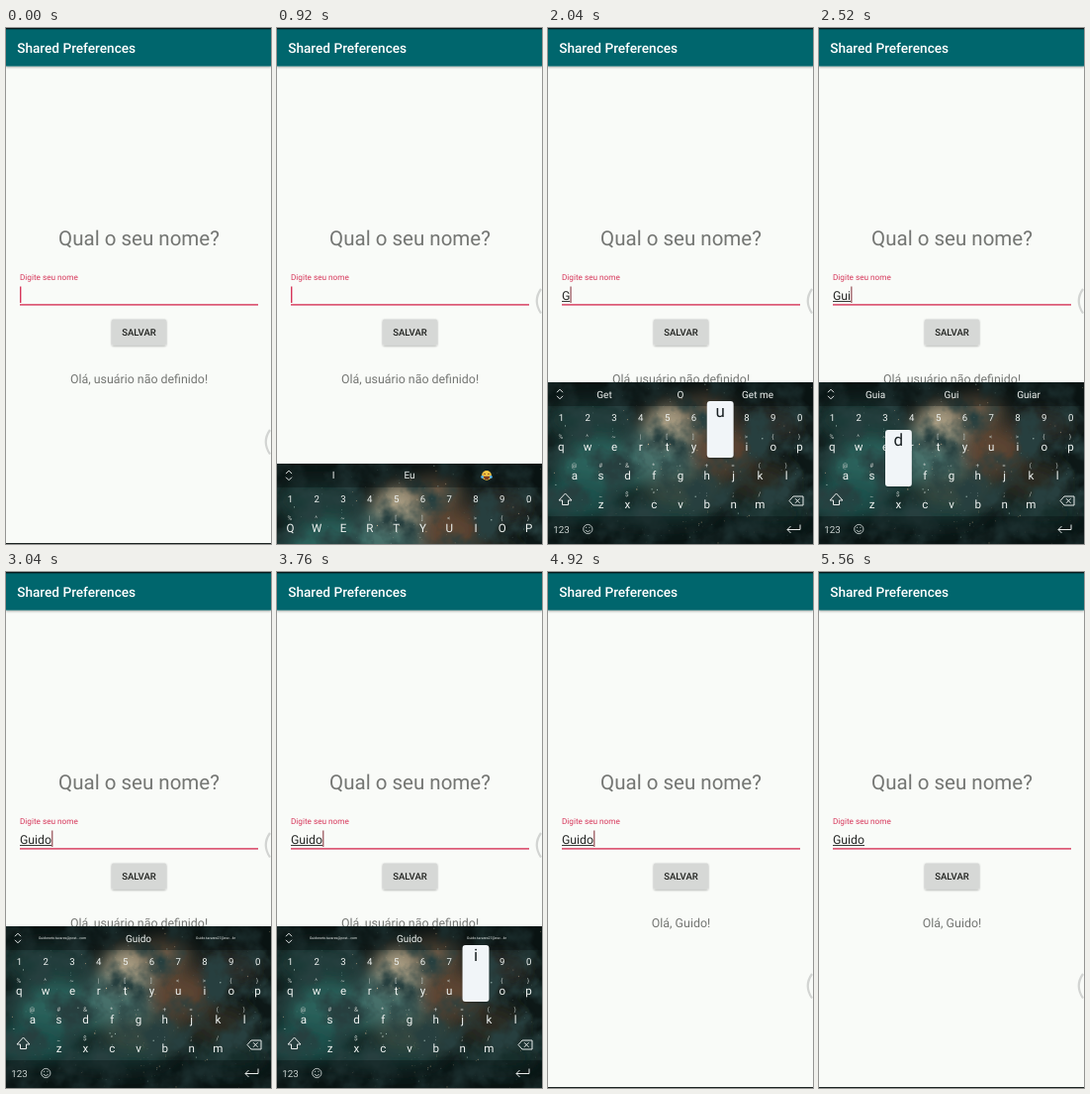
An HTML page for the animation above (5600 ms loop, 268x520 px).

```html
<!DOCTYPE html>
<html lang="pt-BR">
<head>
<meta charset="utf-8">
<title>Shared Preferences</title>
<style>
  html, body { margin: 0; width: 100%; height: 100%; overflow: hidden; background: #f9fbf8; }
  svg { display: block; width: 268px; height: 520px; }
  text { font-family: Roboto, "Noto Sans", sans-serif; text-rendering: geometricPrecision; white-space: pre; }
</style>
</head>
<body>
<svg id="stage" viewBox="0 0 268 520" xmlns="http://www.w3.org/2000/svg">
  <defs>
    <filter id="soft" x="-50%" y="-50%" width="200%" height="200%"><feGaussianBlur stdDeviation="9"/></filter>
    <filter id="shade" x="-10%" y="-20%" width="120%" height="150%">
      <feDropShadow dx="0" dy="1" stdDeviation="1" flood-opacity=".35"/>
    </filter>
    <filter id="clouds" x="0" y="0" width="100%" height="100%">
      <feTurbulence type="fractalNoise" baseFrequency=".035" numOctaves="4" seed="8"/>
      <feColorMatrix values="0 0 0 0 .02  0 0 0 0 .05  0 0 0 0 .05  2.6 0 0 0 -.95"/>
    </filter>
    <clipPath id="board"><rect y="357" width="268" height="163"/></clipPath>
  </defs>
</svg>
<script>
const LOOP = 5600;
const NAME = 'Guido';
const ACCENT = '#d6365a';
const GREY = '#747673';
const stage = document.getElementById('stage');

function el(parent, tag, attrs = {}) {
  const node = document.createElementNS('http://www.w3.org/2000/svg', tag);
  for (const k in attrs) node.setAttribute(k, attrs[k]);
  parent.appendChild(node);
  return node;
}
const rect = (parent, x, y, width, height, fill, more) =>
  el(parent, 'rect', { x, y, width, height, fill, ...more });
const line = (parent, d, stroke = '#e6ebea', width = 1) =>
  el(parent, 'path', { d, stroke, 'stroke-width': width, fill: 'none' });
function label(parent, x, y, str, size, fill, anchor = 'middle', weight = 400) {
  const node = el(parent, 'text', {
    x, y, fill, 'font-size': size, 'text-anchor': anchor, 'font-weight': weight
  });
  node.textContent = str;
  return node;
}
const show = (node, on) => node.setAttribute('visibility', on ? 'visible' : 'hidden');
function setText(node, str) {
  if (node.textContent !== str) node.textContent = str;
}

// App screen
rect(stage, 0, 0, 268, 520, '#f9fbf8');
rect(stage, 0, 1, 268, 37.5, '#00666d', { filter: 'url(#shade)' });
rect(stage, 0, 0, 268, 1.3, '#06191b');
label(stage, 11.2, 25, 'Shared Preferences', 13.64, '#fff', 'start', 500);
label(stage, 134.5, 219, 'Qual o seu nome?', 20.5, GREY);
label(stage, 14, 254, 'Digite seu nome', 8.18, ACCENT, 'start');
const typed = label(stage, 14, 273.6, '', 12.28, '#242624', 'start');
const underline = rect(stage, 14, 275, 0, 0.9, '#242624');
const cursor = rect(stage, 14, 260.5, 1.4, 16.5, ACCENT);
rect(stage, 14, 278.2, 241, 1.4, ACCENT);
const button = rect(stage, 107, 293.5, 55, 26, '#d6d8d6', { rx: 1.4, filter: 'url(#shade)' });
label(stage, 134.5, 310.2, 'SALVAR', 9.55, '#20221f', 'middle', 500);
const greeting = label(stage, 134.5, 357.6, '', 12.4, GREY);
const handle = line(stage, 'M267 405Q258.5 417 267 429.5', '#d2d4d2', 2.2);
rect(stage, 0, 519, 268, 1, '#1c2422');

// Keyboard backdrop
const board = el(stage, 'g');
const sky = el(board, 'g', { 'clip-path': 'url(#board)' });
rect(sky, 0, 357, 268, 163, '#0d1817');
const glow = el(sky, 'g', { filter: 'url(#soft)' });
[
  [40, 395, 45, 22, '#1d3a38'], [60, 440, 55, 26, '#2a625c'], [25, 475, 40, 22, '#1c4f4c'],
  [120, 425, 38, 34, '#47706a'], [125, 396, 25, 20, '#a89c82'], [160, 385, 26, 16, '#6f5c46'],
  [175, 425, 34, 24, '#5d4531'], [140, 465, 42, 18, '#37483f'], [215, 455, 34, 20, '#2b2a21'],
  [225, 400, 34, 18, '#2c2c25'], [110, 490, 60, 12, '#1a3f3d'], [225, 490, 40, 14, '#17302e']
].forEach(([cx, cy, rx, ry, fill]) => el(glow, 'ellipse', { cx, cy, rx, ry, fill }));
rect(sky, 0, 357, 268, 163, '#000', { filter: 'url(#clouds)' });

let seed = 71;
const rand = () => (seed = seed * 16807 % 2147483647) / 2147483647;
for (let i = 0; i < 240; i++) {
  const mid = i % 3 === 0;
  el(sky, 'circle', {
    cx: (mid ? 70 + 120 * (rand() + rand()) / 2 : 268 * rand()).toFixed(1),
    cy: (357 + 163 * rand()).toFixed(1),
    r: (0.25 + 0.55 * rand() ** 3).toFixed(2),
    fill: rand() < 0.6 ? '#b9d6cd' : '#e0bf98',
    opacity: (0.25 + 0.55 * rand()).toFixed(2)
  });
}
rect(sky, 0, 357, 268, 24, '#050b0b', { opacity: .35 });
rect(sky, 0, 492, 268, 28, '#050d0d', { opacity: .35 });

// Keys
const PITCH = 26.8;
const ROWS = [
  { keys: 'qwertyuiop', hints: '%^~|[]<>{}', x: 13.4, y: 426 },
  { keys: 'asdfghjkl', hints: '@#&*-+=()', x: 26.8, y: 455 },
  { keys: 'zxcvbnm', hints: '_$"\':;/', x: 53.6, y: 484 }
];
const INK = '#f0f4f2';
const keys = {};
[...'1234567890'].forEach((n, i) => label(board, 13.4 + i * PITCH, 396.3, n, 9.6, INK));
for (const { keys: row, hints, x, y } of ROWS) {
  [...row].forEach((ch, i) => {
    const cx = x + i * PITCH;
    label(board, cx - 0.5, y - 12, hints[i], 6.4, '#c3cbc8');
    keys[ch] = { x: cx, y, node: label(board, cx, y, ch, 11.6, INK) };
  });
}
line(board, 'M9 367.2l3-3 3 3M9 370.8l3 3 3-3');
line(board, 'M17.5 469l6.5 7h-3.5v4.5h-6V476H11z');
const capsBar = line(board, 'M13.5 483h8', INK, 1.2);
line(board, 'M244 476.5l4-4.5h10v9h-10zM250 474.2l4.6 4.6m0-4.6l-4.6 4.6');
line(board, 'M255 500.5v5h-13m3.5-3.5l-3.5 3.5 3.5 3.5');
label(board, 13.5, 508.6, '123', 9.8, '#c8d0ce');
el(board, 'circle', { cx: 40.3, cy: 505, r: 4.6, fill: 'none', stroke: '#c8d0ce', 'stroke-width': .9 });
line(board, 'M37.8 506.2q2.5 3 5 0M38.6 502.8v1.2M42 502.8v1.2', '#c8d0ce', .9);

const words = [57, 134, 212].map(x => label(board, x, 372.6, '', 10, INK));
const laugh = el(board, 'g');
el(laugh, 'circle', { cx: 212, cy: 369, r: 4.9, fill: '#f5c744' });
el(laugh, 'path', { d: 'M208.8 369.8h6.4q-.4 3.4-3.2 3.4t-3.2-3.4z', fill: '#7a3b22' });
line(laugh, 'M208.8 368q1-1.6 2.2 0M213 368q1.1-1.6 2.2 0', '#7a3b22', .8);
for (const cx of [207.6, 216.4]) el(laugh, 'circle', { cx, cy: 370.6, r: 1.4, fill: '#55aee6' });

const popup = el(board, 'g');
rect(popup, -13.4, -46, 26.8, 57, '#f1f5f8', { rx: 3, filter: 'url(#shade)' });
const popupChar = label(popup, 0, -30, '', 17, '#1b2224');

// Timeline: press start, release, key, whether it types
const PRESSES = [
  [1720, 1840, 'G', true], [1980, 2100, 'u', true], [2200, 2320, 'i', true],
  [2420, 2540, 'd', true], [2640, 2760, 'o', true], [3680, 3840, 'i', false]
];
const SUGGESTIONS = [
  ['I', 'Eu', ''],
  ['Get', 'O', 'Get me'],
  ['Guarda', 'Gu', 'Guia'],
  ['Guia', 'Gui', 'Guiar'],
  ['Guiado', 'Guid', 'Guidão'],
  ['Guidoneto.tavares@post...com', NAME, 'Guido.tavares27@esc...br']
];
const SHOW = [880, 1080], HIDE = [3880, 4080];
const TAP = [4440, 4640], SAVED = 4560;

const ease = p => 1 - (1 - p) ** 3;
const phase = (t, [a, b]) => Math.min(1, Math.max(0, (t - a) / (b - a)));

let shown = -1;
function setTyped(count) {
  if (count === shown) return;
  shown = count;
  typed.textContent = NAME.slice(0, count);
  const width = count ? typed.getComputedTextLength() : 0;
  underline.setAttribute('width', width);
  cursor.setAttribute('x', 14 + width);
  cursor.setAttribute('fill', count ? '#a3666c' : ACCENT);
  words.forEach((node, i) => {
    node.textContent = SUGGESTIONS[count][i];
    const tiny = count === NAME.length && i !== 1;
    node.setAttribute('font-size', tiny ? 3.5 : 10);
    node.setAttribute('y', tiny ? 370 : 372.6);
  });
  const caps = count === 0;
  show(laugh, caps);
  show(capsBar, caps);
  for (const ch in keys) keys[ch].node.textContent = caps ? ch.toUpperCase() : ch;
}

function draw(t) {
  const done = PRESSES.filter(p => p[3] && t >= p[1]);
  setTyped(done.length);
  const blinkFrom = done.length ? done[done.length - 1][1] : -100;
  show(cursor, (t - blinkFrom) % 1000 < 500);

  const up = t < HIDE[0] ? ease(phase(t, SHOW)) : 1 - phase(t, HIDE) ** 2;
  board.setAttribute('transform', `translate(0 ${(163 * (1 - up)).toFixed(2)})`);
  board.setAttribute('display', up > 0 ? 'inline' : 'none');
  handle.setAttribute('transform', `translate(0 ${t >= SHOW[0] && t < HIDE[1] ? -142 : 0})`);

  const press = PRESSES.find(p => t >= p[0] && t < p[1]);
  popup.setAttribute('display', press ? 'inline' : 'none');
  if (press) {
    const key = keys[press[2].toLowerCase()];
    popup.setAttribute('transform', `translate(${key.x} ${key.y - 4})`);
    setText(popupChar, press[2]);
  }
  button.setAttribute('fill', t >= TAP[0] && t < TAP[1] ? '#bfc1bf' : '#d6d8d6');
  setText(greeting, t < SAVED ? 'Olá, usuário não definido!' : `Olá, ${NAME}!`);
}

const start = performance.now();
function tick() {
  draw((performance.now() - start) % LOOP);
  requestAnimationFrame(tick);
}
tick();
</script>
</body>
</html>
```
